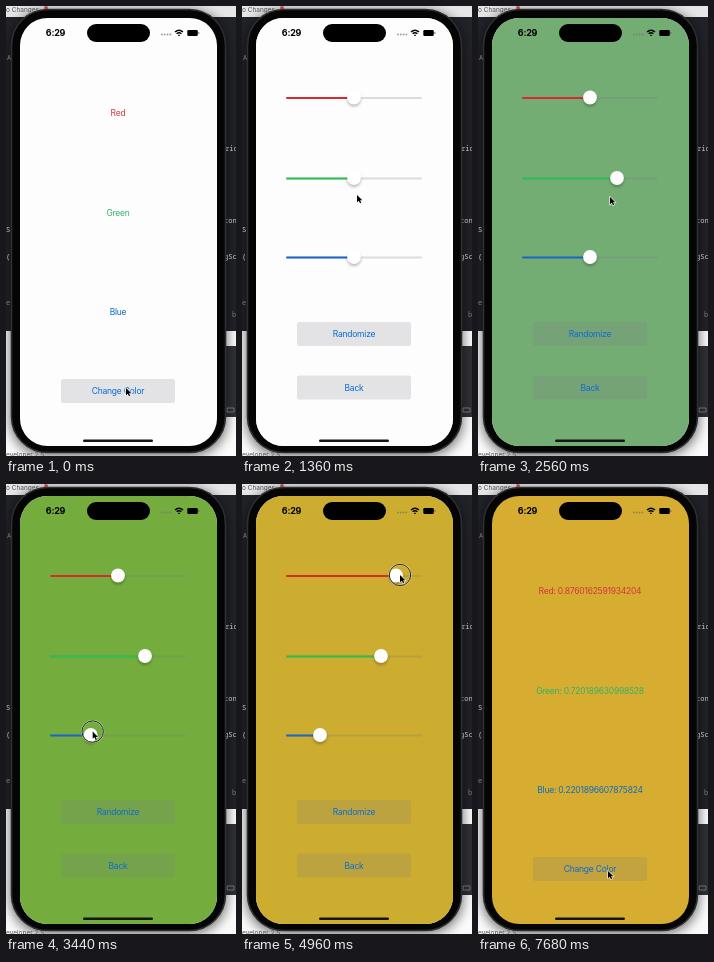
An HTML page that plays this animation: 230x450 px, repeating every 8 s.

```html
<!DOCTYPE html>
<html lang="en">
<head>
<meta charset="utf-8">
<style>
  html, body { margin: 0; height: 100%; overflow: hidden; background: #1f2026; }
  svg { display: block; width: 230px; height: 450px; }
  text { font: 8.5px Inter, sans-serif; letter-spacing: -.23px; text-anchor: middle; }
  .code text { font: 7px "Noto Sans Mono", monospace; letter-spacing: 0; text-anchor: start; fill: #c8c8cc; }
  .code .dim { fill: #77787e; }
  .code .light { font: 6.5px Inter, sans-serif; fill: #555; }
  #clock { font-size: 9px; font-weight: 700; }
  .button rect { fill: #787880; fill-opacity: .2; }
  .button text { fill: #0b6cd2; }
</style>
</head>
<body>
<svg viewBox="0 0 230 450">
  <defs>
    <clipPath id="glass"><rect x="14" y="12" width="197" height="428" rx="27.5"/></clipPath>
    <filter id="blur" x="-20%" y="-20%" width="140%" height="140%"><feGaussianBlur stdDeviation="6"/></filter>
    <filter id="soft" x="-50%" y="-50%" width="200%" height="200%"><feGaussianBlur stdDeviation="1.8"/></filter>
  </defs>

  <g class="code">
    <path fill="#222329" d="M0 0h230v450H0z"/>
    <path fill="#e6e6e6" d="M0 0h230v11H0z"/>
    <path fill="#fafafa" d="M0 325h230v125H0z"/>
    <path fill="#303136" d="M115 340h115v71H115z"/>
    <circle cx="40" cy="2" r="2" fill="#e0544c"/>
    <text class="light" x="0" y="6">o Changes</text>
  </g>
  <rect x="4" y="5" width="217" height="445" rx="36" opacity=".55" filter="url(#blur)"/>
  <g class="code">
    <text class="dim" x="1" y="54">A</text><text x="0" y="226">S</text><text x="0" y="253">(</text>
    <text class="dim" x="0" y="299">e</text><text class="dim" x="226" y="311">b</text>
    <text x="219" y="145">rio</text><text x="218" y="217">con</text><text x="218" y="253">gSc</text>
    <path d="M221 402h7v4h-7z" fill="none" stroke="#888" stroke-width=".7"/>
    <text class="light" x="0" y="451">eveloper 2 S</text>
  </g>

  <rect x="5.5" y="3.5" width="214" height="443" rx="36" fill="#050505" stroke="#2e2f32" stroke-width="1.6"/>

  <g clip-path="url(#glass)">
    <g id="home">
      <rect class="paper" x="13" y="12" width="199" height="429"/>
    </g>
    <g id="mixer">
      <rect class="paper" x="13" y="12" width="199" height="429"/>
    </g>
    <text id="clock" x="49.5" y="30">6:29</text>
    <rect x="81" y="18" width="63" height="18" rx="9"/>
    <g fill="#777" opacity=".75">
      <circle cx="156" cy="28.5" r=".9"/><circle cx="158.8" cy="28.5" r=".9"/>
      <circle cx="161.6" cy="28.5" r=".9"/><circle cx="164.4" cy="28.5" r=".9"/>
    </g>
    <g fill="none" stroke="#000" stroke-width="1.4">
      <path d="M169 26q4-3.6 8 0M170.6 27.8q2.4-2 4.8 0"/><path d="M172.2 29.4h1.6"/>
    </g>
    <rect x="181.3" y="24" width="10.5" height="6" rx="1.3"/>
    <path d="M192.8 26v2" stroke="#555" stroke-width=".8"/>
    <rect x="77" y="433.4" width="70" height="2.7" rx="1.35" fill="#151515"/>
  </g>

  <g id="cursor">
    <g id="ring" fill="none">
      <circle r="10.7" stroke="#fff" stroke-opacity=".5" stroke-width="1.8"/>
      <circle r="10.7" stroke="#111" stroke-width=".9"/>
    </g>
    <path d="M0 0V7.2L1.8 5.7 3 8.3 4.2 7.8 3.1 5.3H5.3Z" stroke="#fff" stroke-width="1.1" paint-order="stroke"/>
  </g>
</svg>
<script>
const $ = id => document.getElementById(id);
const add = (parent, markup) => parent.insertAdjacentHTML('beforeend', markup);
const LOOP = 8000, MIDDLE = 112, PRESENT = 200, DISMISS = 6720, COLORED = 1740;

const channels = [
  { name: 'Red', color: '#d82a30', ink: '#d53540', value: '0.8760162591934204', labelY: 110, y: 91.5, down: 4160, up: 5600 },
  { name: 'Green', color: '#2dbe50', ink: '#2fb36c', value: '0.720189630998528', labelY: 209.5, y: 172, down: 1640, up: 2400 },
  { name: 'Blue', color: '#1a68cc', ink: '#0d6bc4', value: '0.2201896607875824', labelY: 309, y: 251, down: 2920, up: 3760 }
];

// Pointer path: time, x, y
const path = [
  [0, 120, 382], [400, 120, 382], [880, 108, 270], [1040, 108, 259], [1160, 108, 259],
  [1360, 115, 189], [1560, 114, 172], [1680, 114, 172], [2320, 141, 172], [2420, 141, 172],
  [2560, 132, 191], [2800, 114, 250], [2940, 114, 250], [3640, 80, 247], [3800, 80, 247],
  [4000, 116, 91], [4480, 116, 91], [4960, 158, 91], [5460, 162, 91], [5640, 162, 91],
  [5920, 144, 370], [6100, 144, 370], [6400, 130, 387], [LOOP, 130, 387]
];
const clicks = [[80, 200], [6640, 6740], ...channels.map(c => [c.down, c.up])];

const button = (label, y) => `<g class="button"><rect x="55" y="${y}" width="114" height="24" rx="2.5"/>
  <text x="112" y="${y + 15}">${label}</text></g>`;

for (const c of channels) {
  add($('home'), `<text x="112" y="${c.labelY}" fill="${c.ink}"></text>`);
  c.label = $('home').lastElementChild;
  add($('mixer'), `<g transform="translate(0 ${c.y})">
    <rect x="44" y="-.5" width="136" height="2" rx="1" fill="#787880" fill-opacity=".25"/>
    <rect x="44" y="-.5" height="2" rx="1" fill="${c.color}"/>
    <g><circle cy="2.2" r="6.8" opacity=".27" filter="url(#soft)"/><circle r="6.9" fill="#fff"/></g></g>`);
  [, c.fill, c.thumb] = $('mixer').lastElementChild.children;
}
add($('home'), button('Change Color', 373));
add($('mixer'), button('Randomize', 316) + button('Back', 369.5));

const papers = document.querySelectorAll('.paper');
const clamp = (v, lo, hi) => Math.min(hi, Math.max(lo, v));
const smooth = p => p * p * (3 - 2 * p);
const settle = p => 1 - (1 - clamp(p, 0, 1)) ** 3.5;

function pointer(t) {
  const i = path.findIndex(k => k[0] > t);
  const [a, b] = [path[i - 1], path[i]];
  const p = smooth((t - a[0]) / (b[0] - a[0]));
  return [a[1] + (b[1] - a[1]) * p, a[2] + (b[2] - a[2]) * p];
}

function draw(t) {
  const levels = channels.map(c => {
    const x = MIDDLE + pointer(clamp(t, c.down, c.up))[0] - pointer(c.down)[0];
    c.fill.setAttribute('width', x - 44);
    c.thumb.setAttribute('transform', `translate(${x} 0)`);
    c.label.textContent = t < DISMISS ? c.name : `${c.name}: ${c.value}`;
    return Math.round(246 * ((x - 51) / 122) ** 1.08);
  });
  const mixed = `rgb(${levels})`;
  papers[0].setAttribute('fill', t < DISMISS ? '#fdfdfd' : mixed);
  papers[1].setAttribute('fill', t < COLORED ? '#fdfdfd' : mixed);

  const shown = settle((t - PRESENT) / 560) - settle((t - DISMISS) / 560);
  $('mixer').setAttribute('transform', `translate(0 ${430 * (1 - shown)})`);

  $('cursor').setAttribute('transform', `translate(${pointer(t)})`);
  $('ring').style.display = clicks.some(([a, b]) => t >= a && t < b) ? '' : 'none';
}

function tick() {
  draw(performance.now() % LOOP);
  requestAnimationFrame(tick);
}
tick();
</script>
</body>
</html>
```
